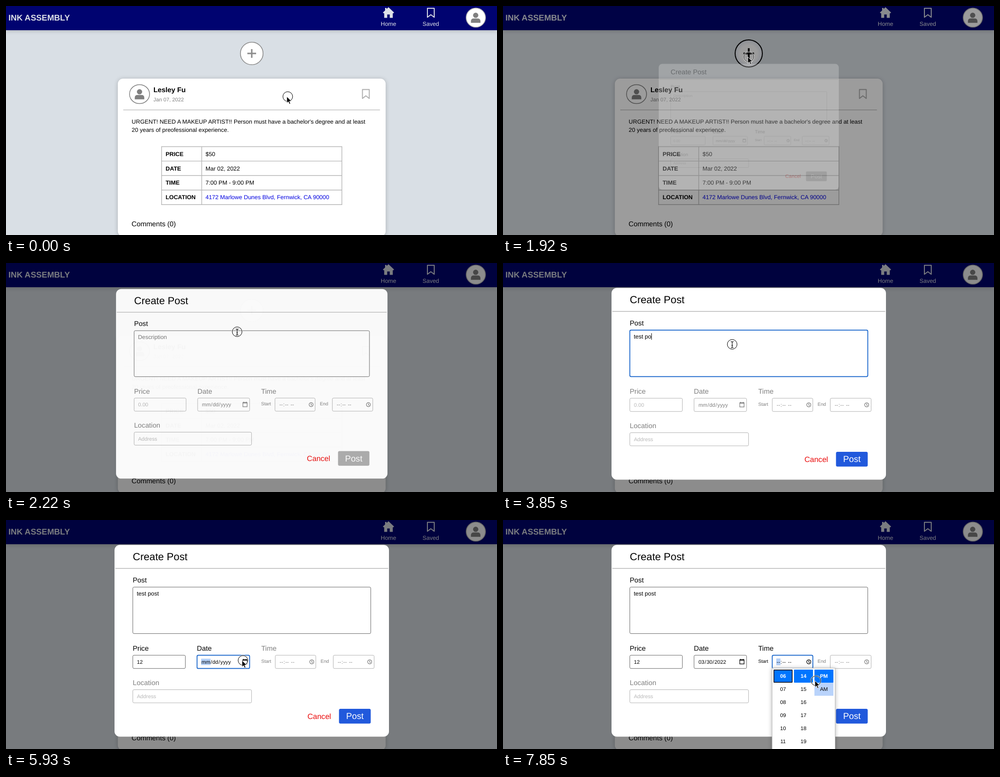
An HTML page that plays this animation: 1009x473 px, repeating every 8000 ms.

```html
<!DOCTYPE html>
<html lang="en">
<head>
<meta charset="utf-8">
<title>Create Post</title>
<style>
  html, body { margin: 0; width: 100%; height: 100%; overflow: hidden; background: #d9dfe5; }
  svg { display: block; width: 1009px; height: 473px; font: 12px "Liberation Sans", Arial, sans-serif; text-rendering: geometricPrecision; }
  text { white-space: pre; }
  .b { font-weight: bold; }
  .mid { text-anchor: middle; }
  .label { font-size: 14.4px; }
  .small { font-size: 10.8px; }
  .tiny { font-size: 9.7px; }
  .hint { fill: #757575; }
  .rule { stroke: #b8b8b8; stroke-width: 1.4; fill: none; }
  .box { fill: #fff; stroke: #6c6c6c; stroke-width: 1; }
  .focus .box { stroke: #1261c9; stroke-width: 1.7; }
  .mark { fill: #b3d0f8; visibility: hidden; }
  .focus .mark { visibility: visible; }
  .field { opacity: .5; }
  .field.on { opacity: 1; }
  .caret { stroke: #000; stroke-width: 1; visibility: hidden; }
  .focus .caret { visibility: visible; }
  .icon { fill: none; stroke: #000; stroke-width: 1.2; }
  .nav { fill: #dde1e8; }
  .plus circle { fill: #fff; stroke: #8c8c8c; stroke-width: 1.6; }
  .plus path { stroke: #8c8c8c; stroke-width: 3; }
  .plus.hot circle { fill: url(#sheen); stroke: #000; }
  .plus.hot path { stroke: #000; }
  .shade { filter: drop-shadow(0 1px 4px rgba(0, 0, 0, .22)); }
  .popup { filter: drop-shadow(0 1px 4px rgba(0, 0, 0, .3)); }
  #cursor path { stroke-linejoin: round; }
</style>
</head>
<body>
<svg viewBox="0 0 1009 473">
  <defs>
    <radialGradient id="sheen">
      <stop offset=".6" stop-color="#fff"/><stop offset="1" stop-color="#e4e9f3"/>
    </radialGradient>
    <g id="person" fill="#808080">
      <circle cy="-5" r="5.4"/>
      <path d="M-9.8 10.5V7.5Q-9.8 1.6-4 1.6H4Q9.8 1.6 9.8 7.5V10.5Z"/>
    </g>
    <path id="flag" d="M-7 -9.5H7V9L0 3.6L-7 9Z" fill="none" stroke-width="1.9" stroke-linejoin="round"/>
    <g id="clock" class="icon"><circle r="4.2"/><path d="M0-2.6V.3L2 1.5"/></g>
  </defs>

  <rect width="1009" height="473" fill="#d9dfe5"/>
  <g class="shade"><rect width="1009" height="50" fill="#000370"/></g>
  <g class="nav">
    <text class="b" x="5" y="30" font-size="17">INK ASSEMBLY</text>
    <path d="M786 2.5L797.5 13.5L796 15H794.8V24.6H788.6V17.5H783.4V24.6H777.2V15H776L774.5 13.5L779 9.2V4H782V6.3Z"/>
    <text class="mid" x="786" y="41">Home</text>
    <use href="#flag" x="873" y="14.3" stroke="#dde1e8"/>
    <text class="mid" x="873" y="41">Saved</text>
  </g>
  <circle cx="965.5" cy="24" r="19.8" fill="#fff" stroke="#b5b5b5" stroke-width="1.6"/>
  <use href="#person" x="965.2" y="24.2"/>

  <g class="plus" id="plus"><circle r="23.3"/><path d="M-9 0H9M0-9V9"/></g>

  <g class="shade"><rect x="229.8" y="150" width="550.4" height="326" rx="11" fill="#fff"/></g>
  <ellipse cx="274.4" cy="182" rx="20.6" ry="19.6" fill="#fff" stroke="#808080" stroke-width="1.5"/>
  <use href="#person" x="274.4" y="182.2"/>
  <text class="b label" x="303" y="177.6">Lesley Fu</text>
  <text class="small" x="303" y="197" fill="#808080">Jan 07, 2022</text>
  <use href="#flag" x="739.5" y="182" stroke="#adadad"/>
  <path class="rule" d="M241 214.6H768.5"/>
  <text x="258.3" y="243">URGENT! NEED A MAKEUP ARTIST!! Person must have a bachelor's degree and at least</text>
  <text x="258.3" y="259.6">20 years of preofessional experience.</text>
  <path class="rule" d="M319.7 290.5H690.3V410.2H319.7ZM319.7 320.4H690.3M319.7 350.3H690.3M319.7 380.2H690.3M402.3 290.5V410.2"/>
  <g class="b">
    <text x="328" y="309.6">PRICE</text><text x="328" y="339.6">DATE</text>
    <text x="328" y="369.3">TIME</text><text x="328" y="399.3">LOCATION</text>
  </g>
  <text x="410" y="309.6">$50</text><text x="410" y="339.6">Mar 02, 2022</text>
  <text x="410" y="369.3">7:00 PM - 9:00 PM</text>
  <text x="410" y="399.3" fill="#0000e0">4172 Marlowe Dunes Blvd, Fernwick, CA 90000</text>
  <text class="label" x="258" y="455">Comments (0)</text>

  <rect id="dim" width="1009" height="473"/>

  <g id="modal">
    <rect x="223" y="51.5" width="564" height="396" rx="11" fill="#fff"/>
    <text x="260.5" y="83.4" font-size="21.3">Create Post</text>
    <path class="rule" d="M224.5 100H785.5"/>

    <g class="field" id="post">
      <text class="label" x="260.5" y="129">Post</text>
      <rect class="box" x="260.6" y="138.6" width="489" height="96" rx="2.5"/>
      <text class="hint" x="268.7" y="155.6">Description</text>
      <text class="value" x="268.7" y="155.6"></text>
      <path class="caret" d="M0 145V158.5"/>
    </g>
    <g class="field" id="price">
      <text class="label" x="260.5" y="269.8">Price</text>
      <rect class="box" x="260.6" y="279.3" width="108" height="27.4" rx="2.5"/>
      <text class="hint small" x="268.9" y="297">0.00</text>
      <text class="value small" x="268.9" y="297"></text>
      <path class="caret" d="M0 287V299"/>
    </g>
    <g class="field" id="date">
      <text class="label" x="392.3" y="269.8">Date</text>
      <rect class="box" x="392.6" y="279.3" width="108" height="27.4" rx="2.5"/>
      <rect class="mark" x="401" y="286.5" width="19.4" height="13"/>
      <text class="value small" x="401" y="297" dx=".7 0 .7 .7 0 .7 .7"></text>
      <path class="icon" d="M486.6 288.6H495.4V297.4H486.6ZM486.6 289.7H495.4M488.5 286.8V289M493.5 286.8V289"/>
    </g>
    <g class="field" id="start">
      <text class="label" x="524.5" y="269.8">Time</text>
      <text class="tiny" x="524.5" y="294.8">Start</text>
      <rect class="box" x="553.3" y="279.3" width="83.4" height="27.4" rx="2.5"/>
      <rect class="mark" x="561.6" y="286" width="8.6" height="14"/>
      <text class="small" x="561.6" y="297" dx=".7 0 .7 .7 0 .7 .7">--:-- --</text>
      <use href="#clock" x="628.4" y="293"/>
    </g>
    <g class="field">
      <text class="tiny" x="646.5" y="294.8">End</text>
      <rect class="box" x="672.5" y="279.3" width="84" height="27.4" rx="2.5"/>
      <text class="small" x="680.8" y="297" dx=".7 0 .7 .7 0 .7 .7">--:-- --</text>
      <use href="#clock" x="747.4" y="293"/>
    </g>
    <g class="field">
      <text class="label" x="260.5" y="341.3">Location</text>
      <rect class="box" x="260.6" y="350.5" width="244" height="27.2" rx="2.5"/>
      <text class="hint small" x="268.9" y="368.2">Address</text>
    </g>
    <text x="619.5" y="410.7" font-size="15.6" fill="#ea0a0a">Cancel</text>
    <rect id="send" x="684.3" y="390" width="65.2" height="30.6" rx="3"/>
    <text class="mid" x="717" y="411.4" font-size="18" fill="#fff">Post</text>
  </g>

  <g id="calendar" class="popup"></g>
  <g id="clockMenu" class="popup"></g>

  <g id="cursor">
    <circle r="10" fill="none" stroke="#fff" stroke-opacity=".75" stroke-width="2.6"/>
    <circle r="10" fill="none" stroke="#000" stroke-width="1"/>
    <path id="arrow" d="M-2 0V13.6L1.2 10.6L3.3 15.6L5.6 14.6L3.5 9.8H7.6Z" stroke="#fff" stroke-width=".9"/>
    <path id="hand" d="M-1.5 3.5q1.5-2 2.8 0v5l1.5-.5 1.6.6 1.6-.2 1.4 1v4l-1.5 4.5h-6.5l-2.5-4-3-3.5q.5-1.6 2.2-.8l1.8 1.5z" fill="#fff" stroke="#000" stroke-width="1"/>
    <path id="beam" d="M-2.8-5.6Q0-5.6 0-4.2Q0-5.6 2.8-5.6M0-4.5V6M-2.8 7Q0 7 0 5.6Q0 7 2.8 7M-1.5 2.2H1.5" fill="none" stroke="#000" stroke-width="1.1"/>
  </g>
</svg>
<script>
const LOOP = 8000;
const $ = id => document.getElementById(id);
const show = (id, on) => $(id).style.display = on ? '' : 'none';

// Each track is a list of [time, ...values]; a value holds until the next entry.
const tracks = {
  cursor: [
    [0, 579, 187], [590, 562, 170], [740, 540, 141], [890, 515, 112], [1030, 507, 99],
    [1330, 506, 102], [1480, 506, 104], [1920, 505, 105], [2070, 494, 122], [2220, 475, 142],
    [2370, 472, 158], [2510, 471, 168], [5050, 472, 180], [5190, 476, 210], [5340, 484, 250],
    [5490, 492, 285], [5640, 495, 300], [5790, 491, 295], [5930, 487, 290], [6220, 489, 262],
    [6370, 487, 219], [6670, 520, 240], [6810, 600, 290], [6960, 648, 318], [7110, 631, 295],
    [7410, 630, 300], [7560, 634, 315], [7700, 640, 327], [7850, 643, 332]
  ],
  pointer: [[0, 'arrow'], [890, 'hand'], [1920, 'arrow'], [2220, 'beam'], [5340, 'arrow']],
  plus: [[0, 1], [890, 1.1], [1030, 1.2], [2070, 1]],
  // scale, opacity, dimming
  modal: [[0, .5, 0, 0], [1920, .656, .23, .39], [2070, .92, .78, .44], [2220, .989, .96, .45], [2370, 1, 1, .45]],
  focus: [[0, ''], [2510, 'post'], [4450, 'price'], [5930, 'date'], [7110, 'start']],
  hover: [[0, ''], [2220, 'post'], [4450, ''], [5490, 'date'], [6080, ''], [6960, 'start']],
  post: [[0, 0], [2950, 1], [3100, 2], [3250, 3], [3550, 4], [3850, 7], [4000, 8], [4150, 9]],
  price: [[0, 0], [4750, 1], [4900, 2]],
  popup: [[0, ''], [6080, 'calendar'], [6520, ''], [7260, 'clockMenu']]
};
const words = { post: 'test post', price: '12' };

function at(name, t) {
  let hit;
  for (const key of tracks[name]) if (key[0] <= t) hit = key;
  return hit.slice(1);
}

const rect = (x, y, w, h, attrs) => `<rect x="${x}" y="${y}" width="${w}" height="${h}" ${attrs}/>`;
const label = (x, y, s, attrs = '') => `<text x="${x}" y="${y}" ${attrs}>${s}</text>`;

function buildCalendar() {
  let out = rect(392.5, 66.5, 190, 211.5, 'fill="#fff" stroke="#bbb" rx="2"');
  out += label(402, 86, 'March 2022 ▾', 'class="b small"');
  out += '<path class="icon" d="M545 86V77M541.5 80.5L545 77L548.5 80.5M567 77V86M563.5 82.5L567 86L570.5 82.5"/>';
  [...'SMTWTFS'].forEach((d, i) => out += label(412.5 + i * 25, 111, d, 'class="mid small"'));
  for (let i = 0; i < 42; i++) {
    const day = i - 1, inside = day > 0 && day < 32;
    const n = inside ? day : day < 1 ? day + 28 : day - 31;
    const x = 412.5 + i % 7 * 25, y = 129 + Math.floor(i / 7) * 22;
    if (day === 30) out += rect(x - 11.5, y - 10, 23, 20, 'id="pick" fill="#b8d4fb" rx="2"');
    out += label(x, y + 4, n, `class="mid small" fill="${inside ? '#000' : '#999'}"`);
  }
  out += label(402, 268, 'Clear', 'class="small" fill="#0075ff"');
  out += label(573, 268, 'Today', 'class="small" fill="#0075ff" text-anchor="end"');
  $('calendar').innerHTML = out;
}

function buildClockMenu() {
  const pad = n => String(n).padStart(2, '0');
  let out = rect(553, 306, 129.5, 180, 'fill="#fff" stroke="#bbb"');
  out += rect(640, 336, 39, 27, 'id="am" fill="#b9d3fb"');
  for (let row = 0; row < 6; row++) {
    [pad(6 + row), 14 + row, ['PM', 'AM'][row]].forEach((s, col) => {
      if (!s) return;
      const x = 556 + col * 42, y = 309 + row * 27;
      if (!row) out += rect(x, y, 39, 27, 'fill="#0075ff" rx="1"');
      if (!row && !col) out += rect(x + .7, y + .7, 37.6, 25.6, 'fill="none" stroke="#101010" stroke-width="1.5" rx="1"');
      out += label(x + 19.5, y + 17.4, s, `class="mid small${row ? '' : ' b'}" fill="${row ? '#000' : '#fff'}"`);
    });
  }
  $('clockMenu').innerHTML = out;
}

function type(id, t) {
  const text = words[id].slice(0, at(id, t)[0]);
  const value = $(id).querySelector('.value');
  value.textContent = text;
  $(id).querySelector('.hint').style.display = text ? 'none' : '';
  const x = +value.getAttribute('x') + (text ? value.getComputedTextLength() : 0) + .5;
  $(id).querySelector('.caret').setAttribute('transform', `translate(${x})`);
  return text;
}

function draw(t) {
  const [x, y] = at('cursor', t), [pointer] = at('pointer', t);
  $('cursor').setAttribute('transform', `translate(${x} ${y})`);
  for (const id of ['arrow', 'hand', 'beam']) show(id, id === pointer);

  const [zoom] = at('plus', t);
  $('plus').setAttribute('transform', `translate(505 98) scale(${zoom})`);
  $('plus').classList.toggle('hot', zoom > 1);

  const [scale, alpha, dim] = at('modal', t);
  $('dim').setAttribute('opacity', dim);
  $('modal').setAttribute('opacity', alpha);
  $('modal').setAttribute('transform', `translate(505 249.5) scale(${scale}) translate(-505 -249.5)`);

  const post = type('post', t), price = type('price', t), dated = t >= 6520;
  $('date').querySelector('.value').textContent = dated ? '03/30/2022' : 'mm/dd/yyyy';
  $('date').querySelector('.mark').style.display = dated ? 'none' : '';
  $('send').setAttribute('fill', post ? '#2159dc' : '#adadad');

  const [focus] = at('focus', t), [hover] = at('hover', t);
  const filled = { post, price, date: dated };
  for (const id of ['post', 'price', 'date', 'start']) {
    $(id).classList.toggle('focus', id === focus);
    $(id).classList.toggle('on', id === focus || id === hover || !!filled[id]);
  }

  const [popup] = at('popup', t);
  for (const id of ['calendar', 'clockMenu']) show(id, id === popup);
  show('pick', t >= 6370);
  show('am', t >= 7850);
}

buildCalendar();
buildClockMenu();
const begin = performance.now();
function tick() {
  draw((performance.now() - begin) % LOOP);
  requestAnimationFrame(tick);
}
tick();
</script>
</body>
</html>
```
